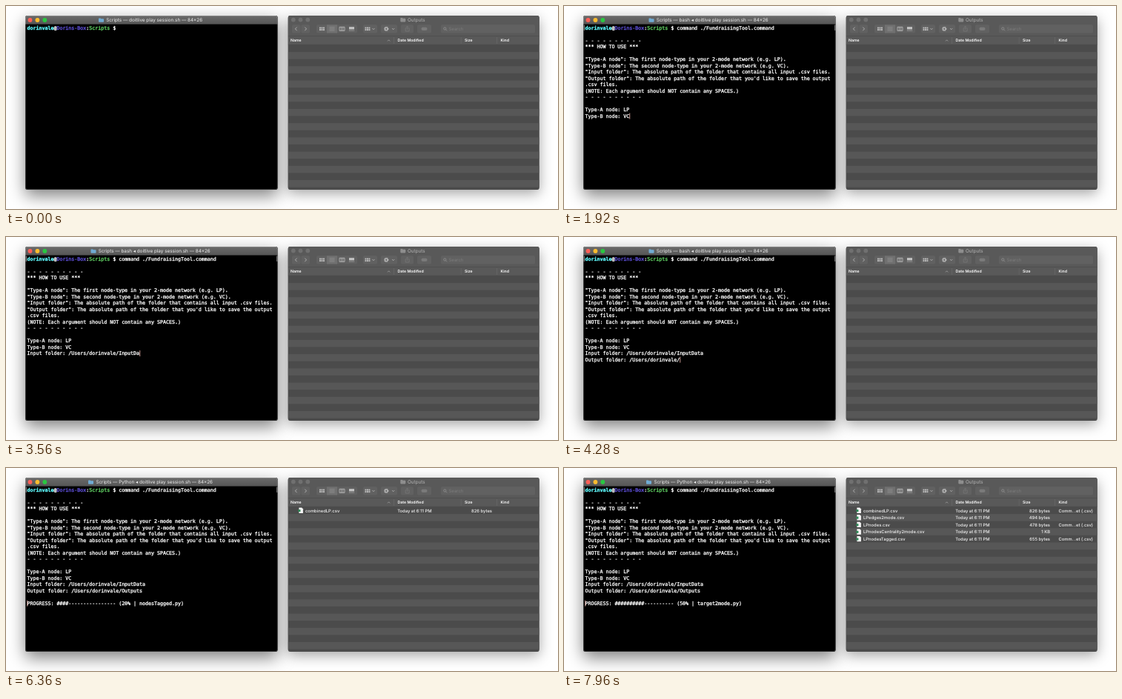
An HTML page that plays this animation: 745x274 px, repeating every 8 s.

```html
<!DOCTYPE html>
<html lang="en">
<head>
<meta charset="utf-8">
<title>Terminal and folder</title>
<style>
  html, body { margin: 0; width: 100%; height: 100%; overflow: hidden; background: #fff; }
  svg { display: block; width: 745px; height: 274px; }
  text { white-space: pre; text-rendering: geometricPrecision; font-family: Inter, "Open Sans", sans-serif; }
  .focused { filter: drop-shadow(0 0 .5px rgba(0, 0, 0, .4)) drop-shadow(0 8px 11px rgba(0, 0, 0, .5)); }
  .idle { filter: drop-shadow(0 0 .5px rgba(0, 0, 0, .3)) drop-shadow(0 5px 9px rgba(0, 0, 0, .36)); }
  .rim { fill: none; stroke: #fff; stroke-opacity: .28; stroke-width: .8; }
  .title { font-size: 6.33px; fill: #f0f0f0; }
  #lines text, #prompt {
    font: 6.645px "DejaVu Sans Mono", monospace; fill: #fff;
    stroke: #fff; stroke-width: .3px;
  }
  #prompt .user { fill: #5ffcff; stroke: #5ffcff; font-weight: bold; }
  #prompt .at { font-weight: bold; }
  #prompt .host { fill: #6656ea; stroke: #6656ea; }
  #prompt .dir { fill: #68e36c; stroke: #68e36c; }
  .button { fill: #616161; }
  .icon { fill: #c4c4c4; }
  .line { fill: none; stroke: #c0c0c0; stroke-width: .8; }
  .dim { stroke: #949494; }
  .head { font-size: 5.2px; font-weight: 600; fill: #fff; }
  .row text { font-size: 5.85px; font-weight: 500; fill: #f4f4f4; }
</style>
</head>
<body>
<svg viewBox="0 0 745 274">
  <defs>
    <clipPath id="termClip"><rect x="26" y="13" width="340.7" height="235" rx="3"/></clipPath>
    <clipPath id="finderClip"><rect x="380.7" y="13" width="339" height="235" rx="3"/></clipPath>
    <clipPath id="listClip"><rect x="380.7" y="52.3" width="339" height="195.7"/></clipPath>
    <linearGradient id="bar" x2="0" y2="1">
      <stop stop-color="#6a6a6a"/><stop offset="1" stop-color="#565656"/>
    </linearGradient>
    <path id="folder" d="M0 .8q0-.8.8-.8h1.8l.8.8h2.8q.8 0 .8.8v3q0 .8-.8.8h-5.4q-.8 0-.8-.8z"/>
    <path id="down" d="M0 0l1.5 1.5l1.5-1.5"/>
  </defs>

  <rect class="focused" x="26" y="13" width="340.7" height="235" rx="3"/>
  <g clip-path="url(#termClip)">
    <rect x="26" y="13" width="341" height="11.6" fill="url(#bar)"/>
    <circle cx="32.5" cy="19" r="2.9" fill="#ff5f57"/>
    <circle cx="42.4" cy="19" r="2.9" fill="#febc2e"/>
    <circle cx="52.3" cy="19" r="2.9" fill="#28c840"/>
    <use id="termFolder" href="#folder" y="16.4" fill="#70acd4"/>
    <text id="termTitle" class="title" x="200.2" y="21.3" text-anchor="middle"></text>
    <g id="lines"></g>
    <text id="prompt"><tspan class="user">dorinvale</tspan><tspan class="at">@</tspan><tspan class="host">Dorins-Box</tspan>:<tspan class="dir">Scripts</tspan> $ <tspan id="command"></tspan></text>
    <path id="marks" d="M27.3 25.6v7.4M365.8 25.6v7.4" stroke="#c4c4c4" stroke-width=".8"/>
    <rect id="cursor" width=".9" height="8" fill="#dba79f"/>
  </g>
  <rect class="rim" x="26.4" y="13.4" width="339.9" height="234.2" rx="2.6"/>

  <rect class="idle" x="380.7" y="13" width="339" height="235" rx="3" fill="#4b4b4b"/>
  <g clip-path="url(#finderClip)">
    <g id="stripes"></g>
    <g clip-path="url(#listClip)"><g id="files"></g></g>
    <rect x="380.7" y="13" width="339" height="39.3" fill="#595959"/>
    <path d="M380.7 40.7h339M380.7 52.3h339" stroke="#454545" stroke-width=".5"/>
    <g fill="#707070">
      <circle cx="387.8" cy="18.6" r="2.9"/><circle cx="397.5" cy="18.6" r="2.9"/><circle cx="407.3" cy="18.6" r="2.9"/>
    </g>
    <use href="#folder" x="532.3" y="16" fill="#8e8e8e"/>
    <text class="title" x="542" y="20.9" style="fill:#b4b4b4">Outputs</text>

    <g id="buttons" class="button"></g>
    <rect x="433" y="25.3" width="14" height="11.2" fill="#707070"/>
    <path class="line" d="M392.6 28.6l-2.2 2.3l2.2 2.3M403.3 28.6l2.2 2.3l-2.2 2.3"/>
    <g id="grids" class="icon"></g>
    <path class="line dim" d="M436.5 28.8h7M436.5 30.9h7M436.5 33h7"/>
    <path class="line" d="M450 28.4h7v5h-7zM452.4 28.4v5M454.7 28.4v5"/>
    <rect class="icon" x="463" y="28.2" width="7" height="3.3"/>
    <path class="line" d="M463 33.2h7" stroke-dasharray="1.2 .7"/>
    <use class="line" href="#down" x="494.5" y="30.2"/>
    <circle class="line" cx="513.3" cy="30.9" r="2.3" stroke-dasharray="1 .5" style="stroke-width:1.6"/>
    <circle class="line" cx="513.3" cy="30.9" r="1.5"/>
    <use class="line" href="#down" x="521.2" y="30.2"/>
    <path class="line" d="M540.5 30h-1.4v4h5v-4h-1.4M541.6 32v-4.7M540.2 28.6l1.4-1.4l1.4 1.4" style="stroke:#767676"/>
    <rect x="560.5" y="28.8" width="8" height="4.2" rx="2" fill="#7a7a7a"/>
    <circle class="line dim" cx="592.3" cy="30.5" r="1.6"/>
    <path class="line dim" d="M593.5 31.7l1.6 1.6"/>
    <text x="597.5" y="33" font-size="6" fill="#7c7c7c">Search</text>

    <g class="head">
      <text x="384" y="48.4">Name</text>
      <text x="528.5" y="48.4">Date Modified</text>
      <text x="619" y="48.4">Size</text>
      <text x="667.5" y="48.4">Kind</text>
    </g>
    <path class="line" d="M515 47.4l1.6-1.6l1.6 1.6" style="stroke-width:.6"/>
    <path d="M523.5 42v9M614.2 42v9M662.6 42v9" stroke="#6c6c6c" stroke-width=".6"/>
  </g>
</svg>
<script>
const LOOP = 8000, LEFT = 28.5, TOP = 31.5, CHAR = 4, LEADING = 8.52, ROW = 9.6;
const $ = id => document.getElementById(id);

function setAttrs(el, attrs) {
  for (const key in attrs) el.setAttribute(key, attrs[key]);
  return el;
}

function add(parent, tag, attrs, content = '') {
  const el = document.createElementNS('http://www.w3.org/2000/svg', tag);
  el.textContent = content;
  return parent.appendChild(setAttrs(el, attrs));
}

const dashes = '- - - - - - - - - -';
const help = [
  [2, dashes],
  [3, '*** HOW TO USE ***'],
  [5, '"Type-A node": The first node-type in your 2-mode network (e.g. LP).'],
  [6, '"Type-B node": The second node-type in your 2-mode network (e.g. VC).'],
  [7, '"Input folder": The absolute path of the folder that contains all input .csv files.'],
  [8, '"Output folder": The absolute path of the folder that you\'d like to save the output'],
  [9, '.csv files.'],
  [10, '(NOTE: Each argument should NOT contain any SPACES.)'],
  [11, dashes],
];

// keys: [time, characters typed]
const inputs = [
  { line: 0, start: 0, label: ' '.repeat(31), text: 'command ./FundraisingTool.command', keys: [[0, 0], [840, 30], [930, 33]] },
  { line: 13, start: 1320, label: 'Type-A node: ', text: 'LP', keys: [[1420, 0], [1620, 2]] },
  { line: 14, start: 1720, label: 'Type-B node: ', text: 'VC', keys: [[1760, 0], [1920, 2]] },
  { line: 15, start: 2040, label: 'Input folder: ', text: '/Users/dorinvale/InputData', keys: [[2100, 0], [2520, 13], [2800, 17], [3360, 22], [3640, 26]] },
  { line: 16, start: 3720, label: 'Output folder: ', text: '/Users/dorinvale/Outputs', keys: [[3760, 0], [4280, 17], [4900, 24]] },
];
const RUN = 1320, PYTHON = 5080;

const titles = [
  [0, 125, ''],
  [RUN, 114.5, 'bash ◂ '],
  [PYTHON, 111, 'Python ◂ '],
];
const progress = [
  [0, ''],
  [5720, 'nodes.py', 10],
  [6300, 'nodesTagged.py', 20],
  [6680, 'edges2mode.py', 30],
  [7600, 'centrality2mode.py', 40],
  [7800, 'target2mode.py', 50],
];
const files = [
  { name: 'combinedLP.csv', size: '826 bytes', at: 5520, kindAt: 6400 },
  { name: 'LPedges2mode.csv', size: '494 bytes', at: 7640, kindAt: LOOP },
  { name: 'LPnodes.csv', size: '478 bytes', at: 6400, kindAt: 7640 },
  { name: 'LPnodesCentrality2mode.csv', size: '1 KB', at: 7640, kindAt: LOOP },
  { name: 'LPnodesTagged.csv', size: '655 bytes', at: 6400, kindAt: 7640 },
];

const latest = (list, t) => list.filter(item => item[0] <= t).pop();
const clamp = x => Math.max(0, Math.min(1, x));

function typedCount(keys, t) {
  let count = 0;
  for (let i = 1; i < keys.length; i++) {
    const [t0, n0] = keys[i - 1], [t1, n1] = keys[i];
    count += (n1 - n0) * clamp((t - t0) / (t1 - t0));
  }
  return Math.floor(count + 1e-6);
}

const addLine = (line, content) =>
  add($('lines'), 'text', { x: LEFT, y: TOP + line * LEADING }, content);

setAttrs($('prompt'), { x: LEFT, y: TOP });
const helpLines = help.map(([line, content]) => addLine(line, content));
for (const input of inputs) input.el = input.line ? addLine(input.line, '') : $('command');
const progressLine = addLine(18, '');

for (let i = 1; i < 21; i += 2)
  add($('stripes'), 'rect', { x: 380.7, y: 52.5 + i * ROW, width: 339, height: ROW, fill: '#575757' });

for (const [x, width] of [[386, 11.5], [398.4, 11.6], [419, 55], [482, 19], [506, 22], [533, 17], [555, 19], [587, 127]])
  add($('buttons'), 'rect', { x, y: 25.3, width, height: 11.2, rx: 1.8 });

for (const x of [423, 484.5])
  for (let i = 0; i < 6; i++)
    add($('grids'), 'rect', { x: x + i % 3 * 2.5, y: 28.6 + Math.floor(i / 3) * 2.6, width: 1.9, height: 1.9 });

for (const file of files) {
  const row = file.el = add($('files'), 'g', { class: 'row' });
  add(row, 'path', { d: 'M395.4 1h3.8l1.7 1.7v5.7h-5.5z', fill: '#f6f6f6' });
  add(row, 'rect', { x: 394.4, y: 3.6, width: 3, height: 3, fill: '#2f8a57' });
  add(row, 'text', { x: 404, y: 7 }, file.name);
  add(row, 'text', { x: 528.2, y: 7 }, 'Today at 6:11 PM');
  add(row, 'text', { x: 656, y: 7, 'text-anchor': 'end' }, file.size);
  file.kind = add(row, 'text', { x: 667.5, y: 7 }, 'Comm…et (.csv)');
}

function drawTerminal(t) {
  const [, folderX, process] = latest(titles, t);
  setAttrs($('termFolder'), { x: folderX });
  $('termTitle').textContent = `Scripts — ${process}doitlive play session.sh — 84×26`;

  const running = t >= RUN ? 'visible' : 'hidden';
  for (const el of [$('marks'), ...helpLines]) el.style.visibility = running;

  let line = 18, column = 0;
  for (const { line: at, start, label, text, keys, el } of inputs) {
    const count = typedCount(keys, t);
    el.textContent = t < start ? '' : (at ? label : '') + text.slice(0, count);
    if (t >= start && t < PYTHON) [line, column] = [at, label.length + count];
  }

  const [, script, percent] = latest(progress, t);
  progressLine.textContent = script &&
    `PROGRESS: ${'#'.repeat(percent / 5).padEnd(20, '-')} (${percent}% | ${script})`;

  const cursor = setAttrs($('cursor'), {
    x: LEFT + column * CHAR - .2,
    y: TOP - 6.2 + line * LEADING,
  });
  cursor.style.visibility = t < 28 ? 'hidden' : 'visible';
}

function drawFiles(t) {
  let y = 52.5;
  for (const { at, kindAt, el, kind } of files) {
    const shown = clamp((t - at) / 240);
    const eased = shown * (2 - shown);
    setAttrs(el, { transform: `translate(0 ${y + (eased - 1) * ROW})`, opacity: shown });
    kind.style.visibility = t >= kindAt ? 'visible' : 'hidden';
    y += eased * ROW;
  }
}

function frame() {
  const t = performance.now() % LOOP;
  drawTerminal(t);
  drawFiles(t);
  requestAnimationFrame(frame);
}
frame();
</script>
</body>
</html>
```
